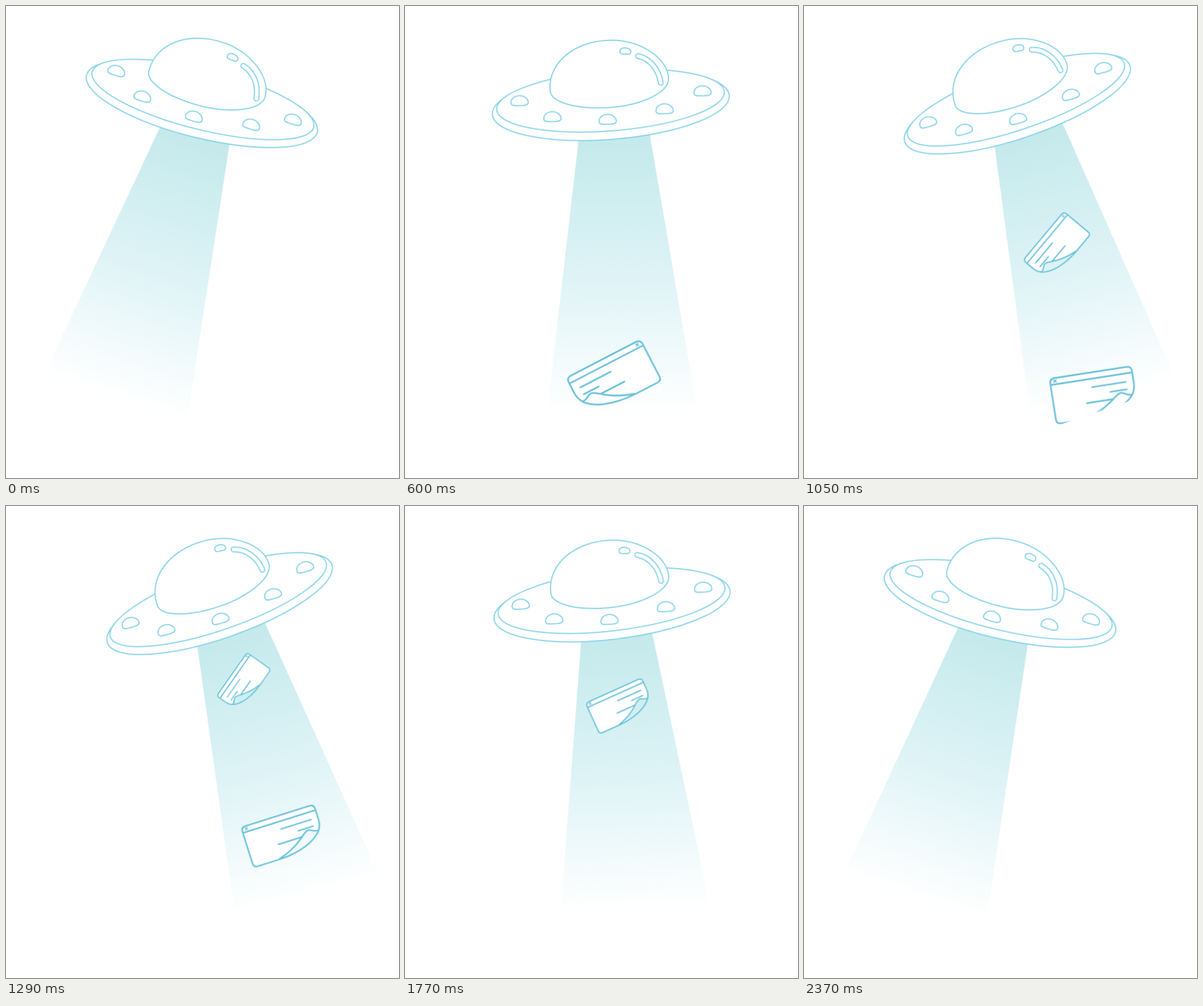
An HTML page for the animation above (2.4 s loop, 683 by 820 pixels).

```html
<!DOCTYPE html>
<html lang="en">
<head>
<meta charset="utf-8">
<title>Flying saucer</title>
<style>
  html, body { margin: 0; width: 100%; height: 100%; overflow: hidden; background: #fff; }
  svg { display: block; width: 100%; height: 100%; }

  .rock {
    transform-origin: 356px 118px;
    animation: rock 2400ms infinite;
  }
  .ship { fill: #fff; stroke: #87d3e9; stroke-width: 2; }
  .ship .tube { fill: none; stroke-width: 10.2; stroke-linecap: round; }
  .ship .tube + .tube { stroke: #fff; stroke-width: 6.2; }

  .card {
    fill: none; stroke: #69c1da; stroke-width: 2.9;
    stroke-linecap: round; stroke-linejoin: round;
    animation: 2400ms infinite;
  }
  .page { fill: #fff; stroke: none; }
  .mark { stroke-width: 1.8; }
  .first { animation-name: first; animation-delay: -45ms; }
  .second { animation-name: second; animation-delay: -1883ms; }

  @keyframes rock {
    0% { transform: rotate(18.3deg); animation-timing-function: cubic-bezier(.36, .03, .63, 1); }
    47.5%, 53.7% { transform: rotate(-14.8deg); animation-timing-function: cubic-bezier(.36, 0, .64, .925); }
    100% { transform: rotate(18.3deg); }
  }
  @keyframes first {
    0% {
      transform: translate(360.5px, 799px) rotate(-21.3deg) scale(1.178);
      animation-timing-function: cubic-bezier(.364, 0, .636, 1);
    }
    84.46%, 100% { transform: translate(364px, 145px) rotate(-46.8deg) scale(.453); }
  }
  @keyframes second {
    0% {
      transform: translate(360px, 803px) rotate(14deg) scale(-1.085, 1.085);
      animation-timing-function: cubic-bezier(.364, 0, .636, 1);
    }
    84.46%, 100% { transform: translate(367px, 136px) rotate(-38.5deg) scale(-.585, .585); }
  }
</style>
</head>
<body>
<svg viewBox="0 0 683 820">
  <defs>
    <linearGradient id="glow" gradientUnits="userSpaceOnUse" x1="0" y1="215" x2="0" y2="703">
      <stop offset="0" stop-color="#c3e9eb"/>
      <stop offset=".52" stop-color="#def3f6"/>
      <stop offset="1" stop-color="#fff"/>
    </linearGradient>
    <clipPath id="above">
      <path d="M-300 0H1000V676L-300 775.600Z"/>
    </clipPath>
    <path id="light" d="M-15 3.500C-15-4-8-8.800 0-8.800C8-8.800 15-3 15 3C15 8 8 8.500 0 8.500C-8 8.500-15 9.500-15 3.500Z"/>
    <g id="note">
      <path class="page" d="M-71.500-31Q-71.500-39.500-63-39.500H63Q71.500-39.500 71.500-31V32Q71.500 39.500 64 39.500H20C-28 24-36 4-46 3.500C-54 3-56 11-66 9Q-71.500 0-71.500-10Z"/>
      <path d="M-66 9Q-71.500 0-71.500-10V-31Q-71.500-39.500-63-39.500H63Q71.500-39.500 71.500-31V32Q71.500 39.500 64 39.500H20C-18 39-52 28-66 9C-56 11-54 3-46 3.500C-36 4-28 24 20 38.500"/>
      <path d="M-71-28.500H71M-58-14H1M-58-1H-29M-32 12H14"/>
      <path class="mark" d="M60.500-36.500l4.500 4.500m0-4.500l-4.500 4.500"/>
    </g>
  </defs>

  <g class="rock">
    <path fill="url(#glow)" d="M304.500 205H422L506 705H245Z"/>
    <g clip-path="url(#above)">
      <use class="card first" href="#note"/>
      <use class="card second" href="#note"/>
    </g>
    <g class="ship">
      <ellipse rx="206.600" ry="59.600" transform="translate(357.500 172) rotate(-4.400)"/>
      <ellipse rx="198.500" ry="52.300" transform="translate(357 164.500) rotate(-4.300)"/>
      <path d="M252 145C249 96 298 59.500 358 59.500C412 59.500 457 92.500 458 126C460 152 403 177 337 177C290 177 251 165 252 145Z"/>
      <path d="M373.500 78C374 73.500 380 72.500 384 73C389 73.500 393 76 392.500 80C392 84.500 388 84.500 384 83.500C380 84 373 84.500 373.500 78Z"/>
      <path class="tube" d="M405 87C427 92 441 111 444.500 134"/>
      <path class="tube" d="M405 87C427 92 441 111 444.500 134"/>
      <use href="#light" x="199" y="164"/>
      <use href="#light" x="256" y="192"/>
      <use href="#light" x="352" y="197"/>
      <use href="#light" x="451" y="179"/>
      <use href="#light" x="517" y="148"/>
    </g>
  </g>
</svg>
</body>
</html>
```
